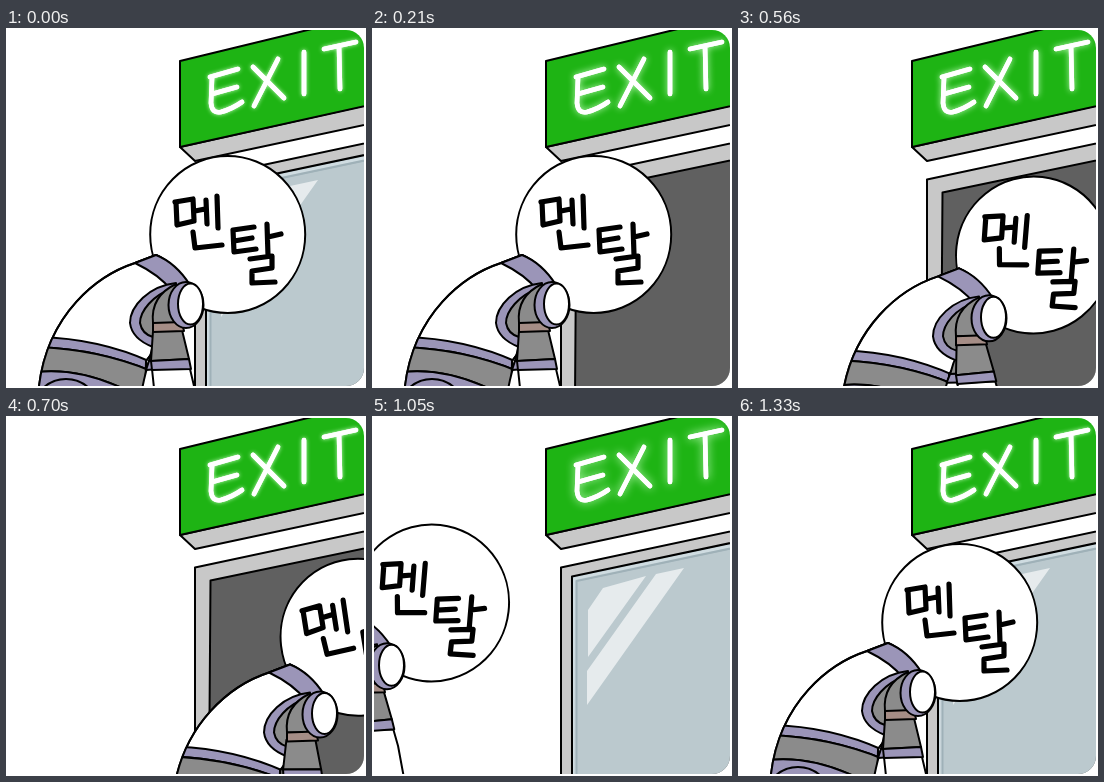
These frames come from a looping animation (360 px wide and 360 px high, 1.4 s). An HTML page with a canvas:

```html
<!DOCTYPE html>
<html lang="ko">
<head>
<meta charset="utf-8">
<style>
html, body { margin: 0; width: 100%; height: 100%; overflow: hidden; background: #fff; }
canvas { display: block; width: 360px; height: 360px; }
</style>
</head>
<body>
<canvas id="stage" width="360" height="360"></canvas>
<script>
const ctx = document.getElementById('stage').getContext('2d');
const STEP = 70, STEPS = 20;
const PURPLE = '#9b95b8', GRAY = '#8b8b8b', METAL = '#c8c8c8';

function shape(d, fill, stroke = '#000', width = 2) {
  const p = new Path2D(d);
  if (fill) { ctx.fillStyle = fill; ctx.fill(p); }
  if (stroke) { ctx.strokeStyle = stroke; ctx.lineWidth = width; ctx.stroke(p); }
}

function oval(x, y, rx, ry, fill) {
  ctx.beginPath();
  ctx.ellipse(x, y, rx, ry, 0, 0, Math.PI * 2);
  ctx.fillStyle = fill;
  ctx.fill();
  ctx.strokeStyle = '#000';
  ctx.lineWidth = 2;
  ctx.stroke();
}

function turned(x, y, deg, draw) {
  ctx.save();
  ctx.translate(x, y);
  ctx.rotate(deg * Math.PI / 180);
  ctx.translate(-x, -y);
  draw();
  ctx.restore();
}

// Piecewise linear lookup in [step, value] pairs
function track(keys, k) {
  let i = 0;
  while (i < keys.length - 2 && k > keys[i + 1][0]) i++;
  const [k0, v0] = keys[i], [k1, v1] = keys[i + 1];
  return v0 + (v1 - v0) * (k - k0) / (k1 - k0);
}

const leave = {
  x: [[0, 0], [5, 0], [6, 12], [8, 71], [10, 134], [12, 203], [17, 378]],
  tilt: [[0, 0], [6, 0], [8, 6.5], [10, -6.5], [12, 6.5], [14, -6.5], [16, 6.5], [18, -6.5]]
};
const enter = {
  x: [[12, -300], [16, -120], [17, -78], [18, -34], [19, 0]],
  tilt: [[13, -6.5], [15, 6.5], [17, -6.5], [19, 0]]
};
const slide = [[0, 0], [3, 162], [10, 162], [13, 0], [20, 0]];

const lettering =
  'M170 174 L171 197 M169 174 L187 171 L188 192 M171 197 L188 193' +
  'M189 183 L199 181 M200 172 L201 196 M211 168 L212 200 M187 204 L189 220 L216 217' +
  'M227 202 L248 199 M227 202 L228 224 M228 213 L246 210 M228 224 L250 221' +
  'M261 196 L262 227 M262 209 L275 206 M244 231 L266 228 L266 240 L246 243 L246 255 L269 254';

const neon =
  'M204 49 L232 41 M206 50 L205 75 Q206 86 215 84 Q226 81 236 74 M206 66 L231 59' +
  'M247 39 L278 70 M272 31 L248 78 M298 24 L298 66 M318 21 L350 14 M333 18 L334 61';

function robot(walk, k) {
  const dx = track(walk.x, k), tilt = track(walk.tilt, k);
  ctx.save();
  ctx.translate(dx, dx * 0.17 + tilt * 0.2);

  turned(160, 235, tilt, () => {
    oval(221.7, 206.5, 77.5, 78.5, '#fff');
    shape(lettering, null, '#000', 5.2);
  });

  // Torso and its bands
  const torso = 'M129 235 C92 247 42 285 33 358 L28 430 H138 L140 333 L165 300 L182 258 Q170 236 150 227 Z';
  shape(torso, '#fff');
  ctx.save();
  ctx.clip(new Path2D(torso));
  shape('M30 309 Q92 310 145 334 V343 Q92 321 30 319 Z', PURPLE);
  shape('M30 319 Q92 321 145 343 V376 Q85 338 30 344 Z', GRAY);
  shape('M30 344 Q85 338 145 376 V450 H20 Z', PURPLE);
  oval(60, 381, 32, 30, PURPLE);
  oval(60, 384, 25, 25, GRAY);
  ctx.restore();
  shape(torso, null);
  shape('M129 235 L150 227 Q170 235 184 257 L166 263 Q154 247 129 235 Z', PURPLE);

  // Far arm
  turned(150, 300, tilt * 0.5, () => {
    shape('M143 333 Q138 350 136 362 L133 430 H165 L166 331 Z', '#fff');
    shape('M150 310 Q145 322 143 333 L166 331 V310 Z', GRAY);
    shape('M143 333 L166 331 V340 L140 342 Z', PURPLE);
  });

  // Shoulder ring
  shape('M170 255 C143 258 124 278 124 295 Q126 311 147 319 L162 300 Z', PURPLE);
  shape('M166 261 C147 267 134 283 134 295 Q136 306 147 309 L162 300 Z', GRAY);

  // Near arm
  turned(163, 290, -tilt * 0.4, () => {
    shape('M146 341 L148 360 L150 430 H198 L188 358 L184 341 Z', '#fff');
    shape('M147 303 L176 302 L183 331 L145 333 Z', GRAY);
    shape('M145 333 L183 331 L185 341 L146 342 Z', PURPLE);
  });
  shape('M147 295 C145 276 153 264 170 256 L178 295 Z', GRAY);
  shape('M147 295 L176 294 L178 303 L147 304 Z', '#a58d86');
  oval(180, 277, 17.5, 23, PURPLE);
  oval(184.5, 276, 12.5, 20.5, '#fff');
  ctx.restore();
}

function doorway() {
  shape('M189 151.5 L370 113 V370 H189 Z', METAL);
  shape('M204.5 164.5 L370 130 V370 H203 Z', '#606060');
}

function door(d) {
  ctx.save();
  ctx.translate(d, -d * 0.208);
  shape('M200 160.5 L560 84.5 V460 H200 Z', 'rgba(199,215,221,.887)');
  shape('M201 162 L560 86 V90 L204.5 165 V460 H201 Z', 'rgba(214,226,231,.6)', null);
  shape('M204.5 460 V165 L560 90', null, '#9fb1b8');
  shape('M216 194 L231 172 L274 160 L216 241 Z M284 158 L312 152 L215 289 V255 Z',
    'rgba(255,255,255,.63)', null);
  ctx.restore();
}

function sign(glow) {
  shape('M174 119 L189 133 L370 94.5 V75 Z', METAL);
  shape('M174 33 L310 0 V-10 H370 V75.5 L174 119 Z', '#1eb414');
  ctx.save();
  ctx.shadowColor = '#c4ffbe';
  ctx.shadowBlur = 4 + 6 * glow;
  shape(neon, null, '#fff', 4.6);
  ctx.restore();
  shape(neon, null, '#fff', 4.6);
}

function draw(k) {
  ctx.fillStyle = '#fff';
  ctx.fillRect(0, 0, 360, 360);
  ctx.save();
  ctx.beginPath();
  ctx.roundRect(2, 2, 356, 356, 18);
  ctx.clip();
  ctx.lineCap = ctx.lineJoin = 'round';

  doorway();
  if (k > 10 && k < 18) robot(leave, k);
  door(track(slide, k));
  sign((1 - Math.cos(k * Math.PI / 5)) / 2);
  if (k <= 10) robot(leave, k);
  if (k > 12) robot(enter, k);
  ctx.restore();
}

const start = performance.now();
function tick() {
  draw(Math.floor(Math.max(0, performance.now() - start) / STEP) % STEPS);
  requestAnimationFrame(tick);
}
tick();
</script>
</body>
</html>
```
